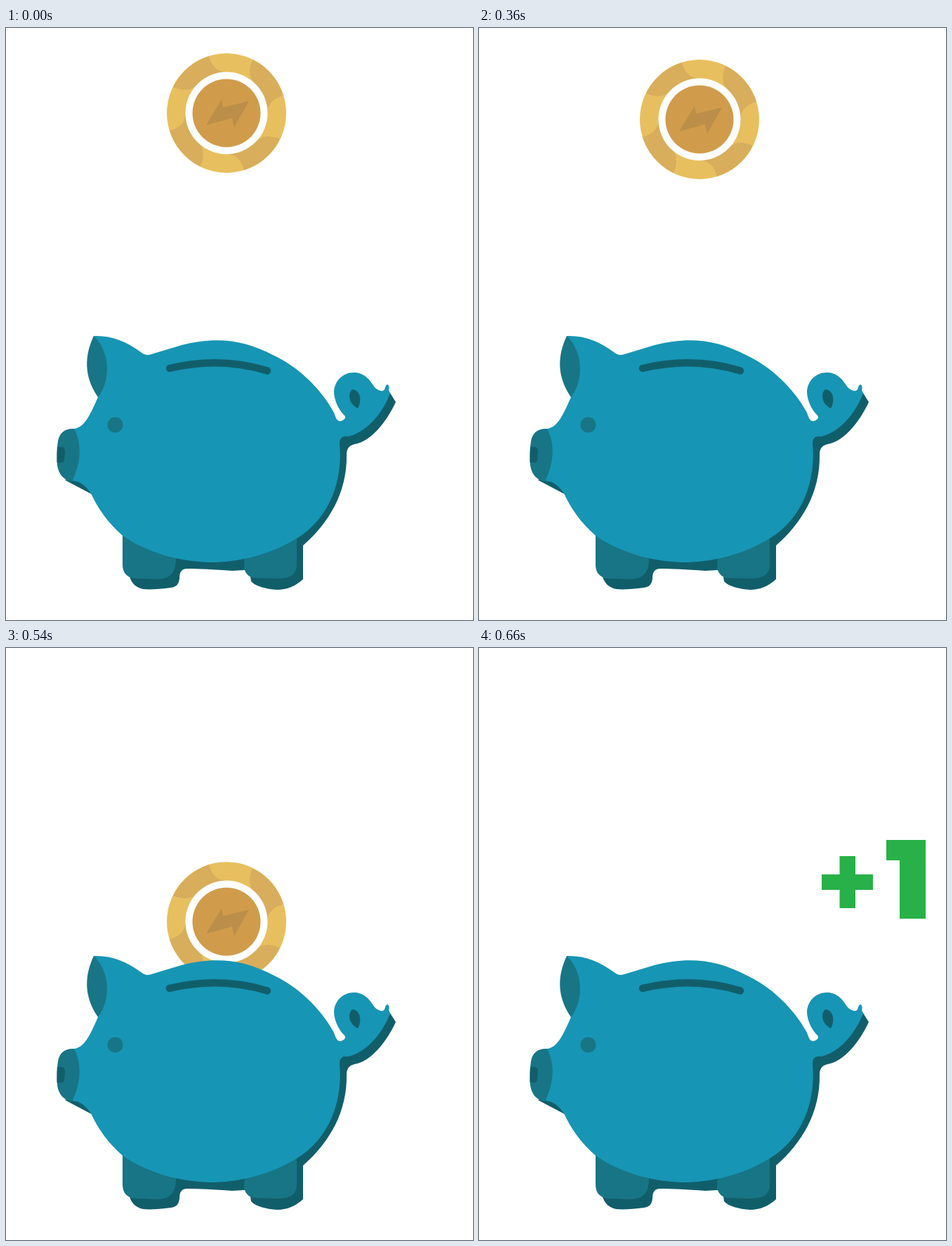
An HTML page with a canvas that plays this animation: 665 px wide and 842 px high, repeating every 1.19 s.

```html
<!DOCTYPE html>
<html lang="en">
<head>
<meta charset="utf-8">
<title>Piggy bank</title>
<style>
  html, body { margin: 0; width: 100%; height: 100%; overflow: hidden; background: #fff; }
  canvas { display: block; }
</style>
</head>
<body>
<canvas id="stage" width="665" height="842" role="img" aria-label="+1"></canvas>
<script>
const ctx = document.getElementById('stage').getContext('2d');
const LOOP = 1190;
const GROUND = 799;
const BODY = '#1795b4', MID = '#187585', DARK = '#115e6b';

const shadow = new Path2D(`M545 516 L555 532 C542 560 520 588 496 592 C488 594 485 599 485 607
  C486 660 460 704 423 736 L423 784 C412 794 400 799 386 799 C370 798 355 794 349 787 L348 780 L340 771
  L322 772 C295 770 275 769 258 769 C250 769 247 774 247 783 C246 792 242 795 235 796
  C220 798 205 799 195 798 C185 796 178 789 176 780 L200 720 L470 590 Z`);
const chin = new Path2D('M84 643 L122 663 L118 645 L95 638 Z');
const frontLeg = new Path2D(`M166 715 L166 763 C166 773 170 778 176 781 C180 783 184 783 190 783
  L215 784 C235 784 242 773 242 755 L242 740 Z`);
const backLeg = new Path2D(`M340 745 L339 769 C342 777 346 781 353 782 L385 783
  C405 783 414 778 414 762 L414 715 Z`);
const body = new Path2D(`M125 438 C150 437 172 446 192 461 C197 465 201 466 207 464 L250 451
  C300 438 340 444 380 465 C415 481 448 512 467 547 C470 557 473 560 477 559
  C483 557 484 554 482 551 C475 545 467 530 467 517 C468 500 482 489 497 490
  C513 491 520 504 525 511 C530 516 537 518 539 514 C540 512 540 508 543 507
  C546 508 546 512 545 515 L547 520 C535 550 513 575 487 581 C478 580 475 583 475 592
  C480 645 460 698 414 726 C375 750 330 760 290 760 C240 758 200 745 166 722
  C145 704 130 682 121 662 C114 652 107 645 95 644 L97 570 C112 568 120 550 131 525 Z`);
const ear = new Path2D('M125 438 C112 465 110 495 131 525 C150 500 148 460 125 438 Z');
const snout = new Path2D(`M97 570 C85 569 76 575 74 588 C72 600 72 610 73 622
  C75 635 82 643 94 645 C105 622 110 595 97 570 Z`);
const nostril = new Path2D('M73 596 L80 596 Q84 597 84 603 L83 614 Q82 619 77 618 L72.5 618 Z');
const tailHole = new Path2D('M493 514 C486 520 488 535 501 541 C507 530 505 515 493 514 Z');
const slot = new Path2D('M233 484 Q305 467 372 487.5');

const rimPatch = new Path2D(`M-76 -37 A85 85 0 0 1 -25 -81 C-21 -66 -13 -59 0 -58
  L-42 -40 C-50 -32 -62 -31 -76 -37 Z`);
const bolt = new Path2D('M-7 -19 L-5 -8 L32 -17 L11 20 L8 7 L-29 17 Z');
const plusOne = new Path2D(`M513.5 296H536V322H561V344H536V370H513.5V344H488V322H513.5Z
  M580 273H636V385H599V302H580Z`);

function fill(path, color) {
  ctx.fillStyle = color;
  ctx.fill(path);
}

function disc(x, y, r, color) {
  ctx.fillStyle = color;
  ctx.beginPath();
  ctx.arc(x, y, r, 0, Math.PI * 2);
  ctx.fill();
}

function drawCoin(y) {
  ctx.save();
  ctx.translate(314, y);
  disc(0, 0, 85, '#e8bf5e');
  for (let i = 0; i < 4; i++) {
    fill(rimPatch, '#d8ad5b');
    ctx.rotate(Math.PI / 2);
  }
  disc(0, 0, 58.5, '#fff');
  disc(0, 0, 48.5, '#d09c4b');
  fill(bolt, '#bb8e49');
  ctx.restore();
}

function drawPig(squash) {
  ctx.save();
  ctx.translate(0, GROUND);
  ctx.scale(1, squash);
  ctx.translate(0, -GROUND);
  fill(shadow, DARK);
  fill(chin, DARK);
  fill(frontLeg, MID);
  fill(backLeg, MID);
  fill(body, BODY);
  fill(ear, MID);
  fill(snout, MID);
  fill(nostril, DARK);
  fill(tailHole, DARK);
  disc(155.5, 564.5, 11, MID);
  ctx.strokeStyle = DARK;
  ctx.lineWidth = 10.5;
  ctx.lineCap = 'round';
  ctx.stroke(slot);
  ctx.restore();
}

function drawPlusOne(scale) {
  ctx.save();
  ctx.translate(483, 385);
  ctx.scale(scale, scale);
  ctx.translate(-483, -385);
  fill(plusOne, '#28b148');
  ctx.restore();
}

// Slow start, then one step every 30 ms, then a hold.
function stepAt(t) {
  if (t < 130) return 0;
  if (t < 230) return 1;
  if (t < 360) return 2;
  return Math.min(13, 3 + Math.floor((t - 360) / 30));
}

function coinY(step) {
  return step < 3 ? 121 + 2.5 * step : 130 + 7.2 * (step - 3) ** 2;
}

function draw(now) {
  const step = stepAt(now % LOOP);
  ctx.fillStyle = '#fff';
  ctx.fillRect(0, 0, 665, 842);
  if (step < 10) {
    drawCoin(coinY(step));
    drawPig(1);
  } else {
    const k = step - 10;
    drawPig(0.881 + 0.119 * k / 3);
    drawPlusOne(k < 3 ? 0.595 + 0.072 * k : 1);
  }
}

const start = performance.now();
function tick() {
  draw(performance.now() - start);
  requestAnimationFrame(tick);
}
tick();
</script>
</body>
</html>
```
